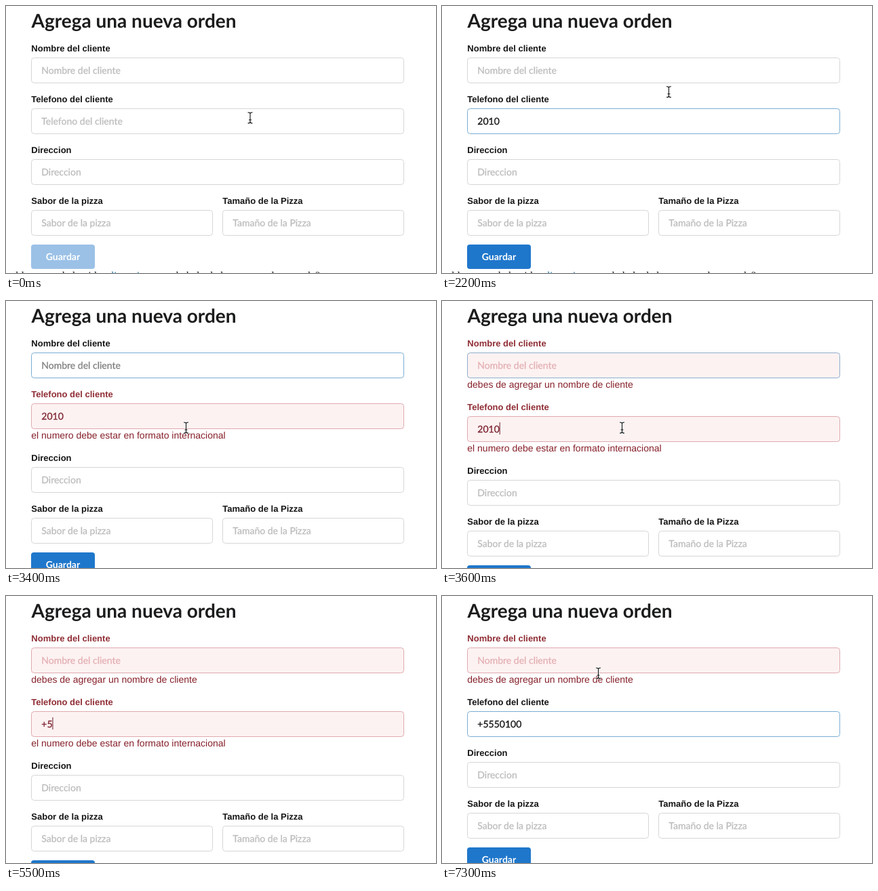
Write an HTML page that moves like this. It is 634 px wide and 394 px high and loops after 7.4 s.

```html
<!DOCTYPE html>
<html lang="es">
<head>
<meta charset="utf-8">
<style>
  html, body { margin: 0; width: 100%; height: 100%; overflow: hidden; background: #fff; }
  svg { display: block; }
  text { font: 14px Lato, sans-serif; text-rendering: geometricPrecision; }
  .title { font-size: 28px; font-weight: 700; fill: #1b1c1d; }
  .label { font: bold 13px "Liberation Sans", Arial, sans-serif; }
  .input { stroke-width: .3; }
  .error { font: 14px "Liberation Sans", Arial, sans-serif; fill: #86202a; }
  .button { font-weight: 700; fill: #fff; text-anchor: middle; }
  .note { font: 16px "Liberation Serif", Times, serif; }
</style>
</head>
<body>
<svg id="stage" width="634" height="394" viewBox="0 0 634 394"></svg>
<script>
const LOOP = 7400, STEP = 100, SHIFT = 19, CHAR = 8.12;
const GREY = [214, 214, 216], BLUE = [122, 174, 212], PINK = [222, 170, 175];

// Time and contents of the phone field
const typing = [
  [0, ''], [1400, '2'], [1500, '20'], [1600, '201'], [1700, '2010'],
  [4000, '201'], [4100, '20'], [4600, '2'], [4700, ''], [5000, '+'],
  [5500, '+5'], [5700, '+55'], [6500, '+5550'], [6700, '+55501'], [6800, '+5550100']
];
const focusing = [[0, ''], [1100, 'phone'], [2700, 'name'], [3600, 'phone']];

// Pointer moves: start, end, from, to
const moves = [
  [0, 1300, 360, 165, 360, 165],
  [1900, 2400, 360, 165, 320.5, 106],
  [2700, 3400, 320.5, 106, 265.5, 187],
  [6900, 7300, 265.5, 187, 230.5, 114]
];
const hidden = [[1300, 1900], [4000, 6900]];

const clamp = v => Math.max(0, Math.min(1, v));
const mix = (a, b, k) => `rgb(${a.map((v, i) => Math.round(v + (b[i] - v) * k))})`;
const last = (list, t) => list.filter(e => e[0] <= t).pop();
const text = (x, y, s, cls, fill = '') =>
  `<text x="${x}" y="${y}" class="${cls}"${fill && ` fill="${fill}"`}>${s}</text>`;

function field(x, y, width, label, o = {}) {
  const labelFill = o.error ? '#8f2d34' : '#151515';
  const hint = o.error ? (o.focus ? '#da9a9c' : '#e3b0b3') : (o.focus ? '#808080' : '#bcbcbc');
  const ink = o.value ? (o.error ? '#7d2530' : '#151515') : hint;
  let s = text(x + .3, y - 9, label, 'label', labelFill) +
    `<rect x="${x + .5}" y="${y + .5}" width="${width - 1}" height="37" rx="4" ` +
    `fill="${o.error ? '#fdf2f2' : '#fff'}" stroke="${o.border || mix(GREY, GREY, 0)}"/>` +
    `<g stroke="${ink}">${text(x + 15.3, y + 24, o.value || label, 'input', ink)}</g>`;
  if (o.caret) {
    const cx = x + 15.2 + CHAR * (o.value || '').length;
    s += `<rect x="${cx}" y="${y + 9}" width="1" height="18" fill="${o.error ? '#6b1c28' : '#000'}"/>`;
  }
  return s + (o.error ? text(x + .3, y + 52, o.error, 'error') : '');
}

function pointer(t) {
  if (hidden.some(([a, b]) => t >= a && t < b)) return '';
  const [a, b, x0, y0, x1, y1] = last(moves, t);
  const p = clamp((t - a) / (b - a)), k = p * p * (3 - 2 * p);
  const d = 'M-3.5-8Q0-8 0-6V6Q0 8 -3.5 8M3.5-8Q0-8 0-6M0 6Q0 8 3.5 8M-2 3H2';
  return `<g fill="none" transform="translate(${x0 + (x1 - x0) * k} ${y0 + (y1 - y0) * k})">` +
    `<path d="${d}" stroke="#fff" stroke-width="2.4"/><path d="${d}" stroke="#111" stroke-width="1.1"/></g>`;
}

function render(t) {
  const [typedAt, value] = last(typing, t), [focusedAt, focus] = last(focusing, t);
  const blink = (t - Math.max(typedAt, focusedAt)) % 1000 < 500;
  const fade = start => clamp((t - start) / 100);
  const nameError = t >= 3600 && 'debes de agregar un nombre de cliente';
  const phoneError = t >= 2700 && t < 6800 && 'el numero debe estar en formato internacional';
  const nameBorder = t < 3600 ? mix(GREY, BLUE, fade(2620)) : mix(BLUE, PINK, fade(3580));
  const phoneBorder = t < 2700 ? mix(GREY, BLUE, fade(1060))
    : t < 6800 ? mix(BLUE, PINK, fade(2640)) : mix(PINK, BLUE, fade(6740));
  const y1 = nameError ? SHIFT : 0, y2 = y1 + (phoneError ? SHIFT : 0);

  return text(37.5, 32, 'Agrega una nueva orden', 'title') +
    field(37, 76, 550, 'Nombre del cliente', {
      error: nameError, border: nameBorder,
      focus: focus === 'name', caret: focus === 'name' && blink
    }) +
    field(37, 151 + y1, 550, 'Telefono del cliente', {
      value, error: phoneError, border: phoneBorder,
      focus: focus === 'phone', caret: focus === 'phone' && blink
    }) +
    field(37, 226 + y2, 550, 'Direccion') +
    field(37, 301 + y2, 268, 'Sabor de la pizza') +
    field(319, 301 + y2, 268, 'Tamaño de la Pizza') +
    `<rect x="37" y="${352 + y2}" width="94" height="36" rx="4" ` +
    `fill="${mix([155, 193, 231], [31, 119, 203], fade(1305))}"/>` +
    text(84, 375 + y2, 'Guardar', 'button') +
    text(7, 402.5 + y2, 'al lo que toda la vida', 'note', '#222') +
    text(151, 402.5 + y2, 'directriz', 'note', '#2a7fb0') +
    text(213, 402.5 + y2, 'en cada lado de la nueva orden creada?', 'note', '#222') +
    pointer(t);
}

const stage = document.getElementById('stage');
let shown = -1;
function tick(now) {
  const t = Math.floor(now % LOOP / STEP) * STEP;
  if (t !== shown) stage.innerHTML = render(shown = t);
  requestAnimationFrame(tick);
}
tick(performance.now());
</script>
</body>
</html>
```
